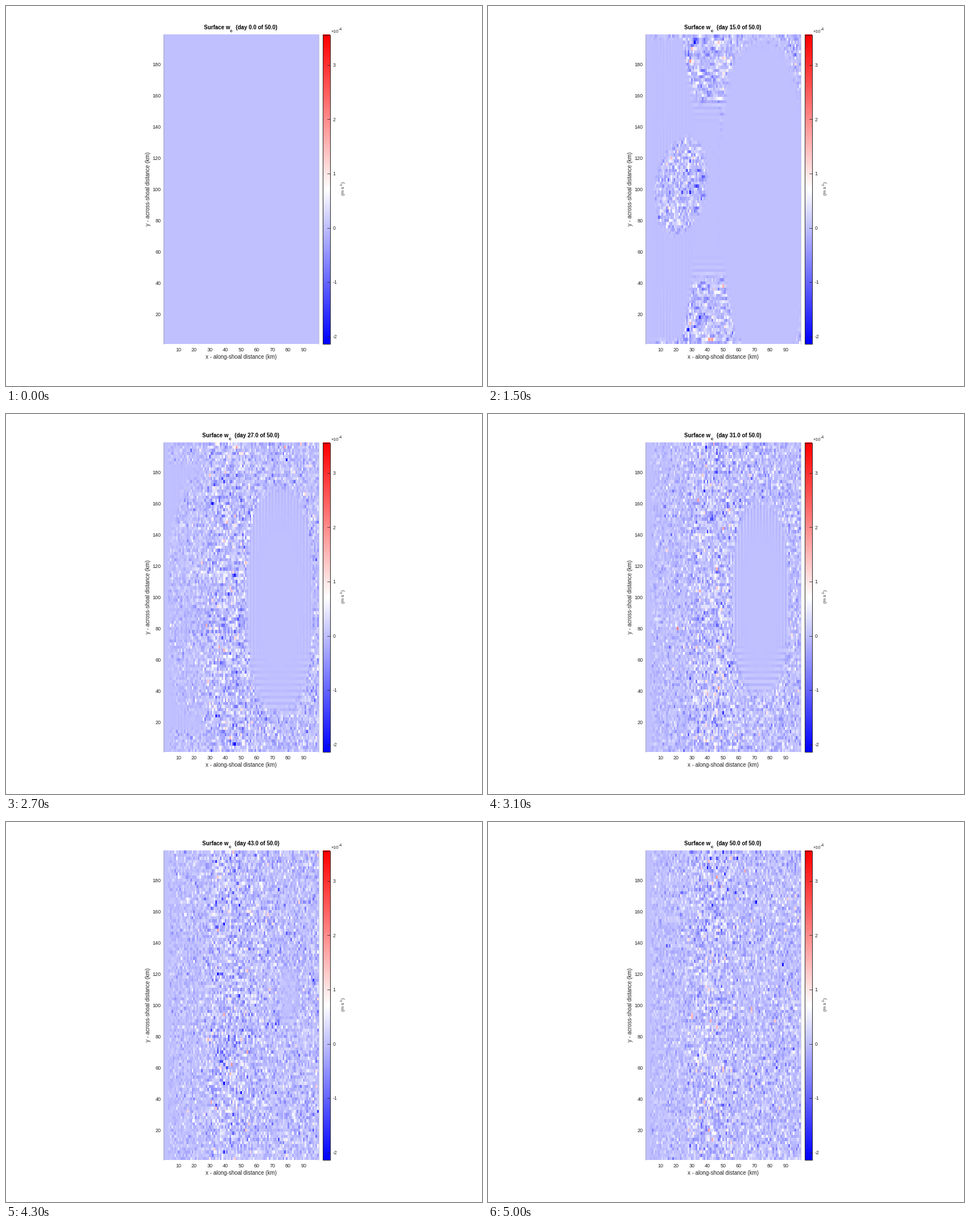
Write a matplotlib script that moves like this. It is 837 px wide and 669 px high and loops after 5100 ms.

```python
import matplotlib.pyplot as plt
import numpy as np
from matplotlib.animation import FuncAnimation
from matplotlib.patches import Rectangle

W, H, DPI = 837, 669, 96
LEFT, RIGHT, TOP, BOTTOM = 277, 549.8, 50.3, 595.3
VMIN, VMAX = -2.14, 3.56
DAYS = 50
N = 99
GREY = "#262626"

plt.rcParams["font.family"] = "Liberation Sans"

fig = plt.figure(figsize=(W / DPI, H / DPI), dpi=DPI, facecolor="white")
ax = fig.add_axes([0, 0, 1, 1])
ax.axis("off")

# Cell centres in km: 1 km wide, 2 km tall.
col, row = np.meshgrid(np.arange(N), np.arange(N))
x, y = col + 1.0, 2.0 * row + 2
edge = np.minimum(y, 200 - y)
flip_x, flip_y = 1 - 2 * (col % 2), 1 - 2 * (row % 2)
strength = np.interp(x, [3, 4.5, 10, 26, 33, 50, 60, 99],
                     [0, .12, .16, .20, .36, .36, .27, .25])


def smooth(a, b, v):
    s = np.clip((v - a) / (b - a), 0, 1)
    return s * s * (3 - 2 * s)


def calm_zone(day):
    """Centre and half-widths of the shrinking calm area on the right."""
    keys = [8, 15, 23, 31, 36, 43, 48]
    lo_x = np.interp(day, keys, [35, 46, 51, 56, 64, 74, 78])
    hi_x = np.interp(day, keys, [112, 103, 99, 92, 89, 87, 82])
    lo_y = np.interp(day, keys, [-60, -30, 15, 38, 55, 88, 100])
    hi_y = np.interp(day, keys, [212, 198, 182, 160, 143, 125, 110])
    return (lo_x + hi_x) / 2, (hi_x - lo_x) / 2, (lo_y + hi_y) / 2, (hi_y - lo_y) / 2


def field(day):
    if day == 0:
        return np.zeros((N, N))
    rng = np.random.default_rng(700 + day)

    # Turbulence spreading along the shoal from the top and bottom edges.
    d = np.abs(x - 41)
    taper = 1 - smooth(8, 20, d)
    front = 6 * (day - 8) * taper - edge
    shoal = smooth(-6, 6, front) * smooth(20, 14, d)

    # Tilted patch growing on the left flank.
    grow = np.clip((day - 7) / 8, 0.05, 1) ** 0.8
    half_x = 17 * grow + 0.5 * max(day - 15, 0)
    half_y = 30 * grow + 1.5 * np.clip(day - 15, 0, 8) + 9 * max(day - 23, 0)
    lean = 102 + 0.4 * (x - 23)
    ring = ((x - 23) / half_x) ** 2 + ((y - lean) / half_y) ** 2
    flank = smooth(1.2, 0.75, ring) * smooth(7, 11, day)

    strip = smooth(3, -3, edge - (day - 12)) * (x < 62) * smooth(9, 15, day)

    cx, a, cy, b = calm_zone(day)
    q = np.abs((x - cx) / a) ** 2.5 + np.abs((y - cy) / b) ** 2.5
    outer = smooth(46, 52, x)
    right = np.maximum(smooth(0.8, 1.2, q), smooth(40, 48, day)) * outer

    active = np.maximum.reduce([shoal, flank, strip, right])
    calm = 1 - active

    # Grid-scale noise, drawn out sideways over the shoal.
    g = rng.normal(size=(N, N))
    wide = (g + np.roll(g, 1, 1) + np.roll(g, 2, 1)) / 1.7
    mix = smooth(28, 33, x) * smooth(55, 50, x) * (0.15 + 0.5 * smooth(32, 20, day))
    g = (1 - mix) * g + mix * wide
    g /= np.sqrt((1 - mix) ** 2 + mix ** 2 + mix * (1 - mix))
    g *= 0.85 + 0.08 * g ** 2
    boost = 1 + 0.7 * smooth(24, 14, day) * (x < 30)
    w = strength * boost * active * g

    # Faint ripples ahead of the noise.
    low = smooth(0.4, 0.6, (cy - y) / b)
    ripple = low * flip_y + (1 - low) * flip_x
    w += 0.14 * calm * outer * smooth(0.2, 1, q) * smooth(17, 34, day) * ripple
    w += 0.11 * calm * taper * smooth(-18, 0, front) * flip_y
    columns = np.exp(-((x - 13) / 5) ** 2) + 0.4 * np.exp(-((x - 26) / 6) ** 2)
    w += 0.06 * calm * columns * smooth(0, 14, day) * (0.6 + 0.4 * np.cos(y / 17)) * flip_x
    return w


def label(px, py, s, size, ha="left", rot=0, color=GREY, **kw):
    return ax.text(px, py, s, fontsize=size * 72 / DPI, ha=ha, va="baseline",
                   rotation=rot, rotation_mode="anchor", color=color, **kw)


image = ax.imshow(field(0), cmap="bwr", vmin=VMIN, vmax=VMAX, origin="lower",
                  extent=(LEFT, RIGHT, BOTTOM, TOP), interpolation="nearest",
                  aspect="auto")
for px, shade in ((LEFT, "#8c8ca8"), (RIGHT, "#a9a9cc")):
    ax.plot([px, px], [TOP, BOTTOM], color=shade, lw=0.5)

for v in range(10, 100, 10):
    label(LEFT + (v - 0.5) * (RIGHT - LEFT) / N, 607.6, str(v), 9, "center")
for v in range(20, 200, 20):
    label(272.6, BOTTOM - (v - 1) * (BOTTOM - TOP) / 198 + 3.3, str(v), 9, "right")
label(413.2, 620.8, "x - along-shoal distance (km)", 9.8, "center")
label(253.4, 322, "y - across-shoal distance (km)", 9.8, "center", 90)

# Colour bar
ax.imshow(np.linspace(VMIN, VMAX, 256)[:, None], cmap="bwr", vmin=VMIN, vmax=VMAX,
          origin="lower", extent=(557.5, 570.5, BOTTOM, TOP), aspect="auto")
ax.add_patch(Rectangle((557.5, 50.5), 13, 544, fill=False, ec=GREY, lw=0.75))
for v in range(-2, 4):
    py = BOTTOM - (v - VMIN) / (VMAX - VMIN) * (BOTTOM - TOP)
    ax.plot([565.5, 570.5], [py, py], color=GREY, lw=0.6)
    label(574.3, py + 3.2, str(v), 8.8)
label(571, 46.8, "×10", 8)
label(585, 42.6, "-4", 7)
label(595, 333, "(m s", 8, rot=90)
label(591.4, 317.3, "-1", 6.4, rot=90)
label(595, 311.8, ")", 8, rot=90)

bold = dict(color="black", weight="bold")
name = label(0, 41.4, "Surface w", 9.8, **bold)
sub = label(0, 46.2, "c", 8, **bold)
clock = label(0, 41.4, "", 9.8, **bold)

ax.set_xlim(0, W)
ax.set_ylim(H, 0)


def draw(day):
    image.set_data(field(day))
    start = 347.8 if day < 10 else 345.1
    name.set_x(start)
    sub.set_x(start + 46.3)
    clock.set_x(start + 56.6)
    clock.set_text(f"(day {day:.1f} of {DAYS:.1f})")
    return image, name, sub, clock


anim = FuncAnimation(fig, draw, frames=DAYS + 1, interval=100, repeat=True)
plt.show()
```
